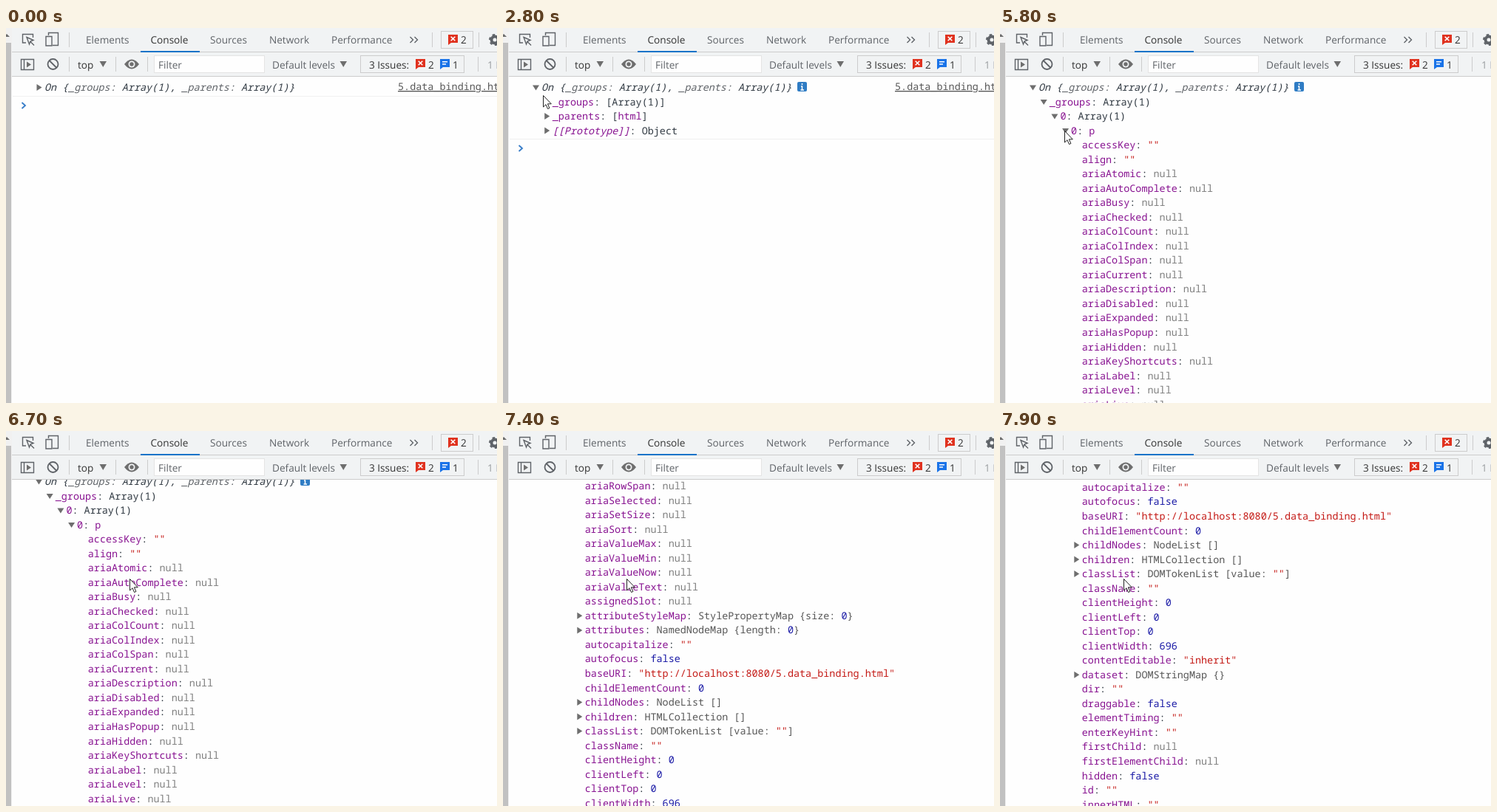
Recreate the animation shown at these times as an HTML page. Size 664 by 508 pixels, loop 8 s.

```html
<!DOCTYPE html>
<html lang="en">
<head>
<meta charset="utf-8">
<title>Console</title>
<style>
  html, body { margin: 0; width: 100%; height: 100%; overflow: hidden; background: #fefefe; }
  svg { display: block; width: 664px; height: 508px; }
  text { white-space: pre; text-rendering: geometricPrecision; }
  .ui text { font: 13.6px "Open Sans", "Noto Sans", sans-serif; fill: #5f6368; }
  .ui .dark { fill: #333333; }
  .mono text { font: 13.45px "Noto Sans Mono", "DejaVu Sans Mono", monospace; fill: #303942; }
  .mono .it { font-style: italic; }
  .key { fill: #881391; }
  .dim { fill: #b871bd; }
  .pre { fill: #5f6368; }
  .mono .obj { fill: #565656; }
  .nil { fill: #808080; }
  .str { fill: #c41a16; }
  .num { fill: #1a1aa6; }
  .line { fill: none; stroke: #5f6368; stroke-width: 1.4; }
  .sep { stroke: #cccccc; }
  .solid { fill: #6e6e6e; }
</style>
</head>
<body>
<svg viewBox="0 0 664 508">
  <defs>
    <clipPath id="view"><rect x="8" y="66" width="656" height="442"/></clipPath>
    <g id="error">
      <path d="M0 0H13V11H4L0 14Z" fill="#e0321f"/>
      <path d="M3.7 2.7L9.3 8.3M9.3 2.7L3.7 8.3" stroke="#fff" stroke-width="1.6"/>
    </g>
    <g id="note">
      <path d="M0 0H13V11H4L0 14Z" fill="#1a73e8"/>
      <path d="M3 3.8H10M3 7H8" stroke="#fff" stroke-width="1.4"/>
    </g>
  </defs>

  <rect width="664" height="508" fill="#fefefe"/>
  <g clip-path="url(#view)"><g id="scroller" class="mono"></g></g>

  <g class="ui">
    <rect width="664" height="66" fill="#f1f3f4"/>
    <rect width="8" height="508" fill="#f1f1f1"/>
    <rect y="20" width="7" height="488" fill="#c1c1c1"/>
    <path class="solid" d="M-3 12L1 8L5 12Z"/>
    <path class="sep" d="M8 32.5H664M8 65.5H664M85.5 6V26M576.5 6V26M639.5 6V26M85.5 39V59M148.5 39V59M191.5 39V59M638.5 39V59"/>
    <rect x="182" y="31" width="80" height="2" fill="#1a73c8"/>

    <path class="line" d="M27 20H22.5V8.5H36.5V13M28 12.5L37 16.5L33 18L31.5 22ZM33 18.5L38 23.5"/>
    <path class="line" d="M57.5 10V6.5H70.5V23.5H63M54 11.5H62V24H54Z"/>
    <text x="108" y="21">Elements</text>
    <text x="195.5" y="21" class="dark">Console</text>
    <text x="276" y="21">Sources</text>
    <text x="356" y="21">Network</text>
    <text x="440" y="21">Performance</text>
    <path class="line" d="M546.5 12L550.5 16L546.5 20M552.5 12L556.5 16L552.5 20"/>
    <rect class="sep" x="588.5" y="4.5" width="43" height="23" fill="none"/>
    <use href="#error" x="598" y="9"/>
    <text x="615" y="21" class="dark">2</text>
    <circle class="line" cx="661" cy="16" r="4.5" style="stroke-width:4"/>
    <circle class="line" cx="661" cy="16" r="7" style="stroke-width:2;stroke-dasharray:3.66"/>

    <path class="line" d="M20.5 42.5H37.5V56.5H20.5ZM24.5 42V57"/>
    <path class="solid" d="M28 45.5L34 49.5L28 53.5Z"/>
    <circle class="line" cx="63.5" cy="49" r="7" style="stroke-width:1.8"/>
    <path class="line" d="M58.5 44L68.5 54" style="stroke-width:1.8"/>
    <text x="97" y="54.5" class="dark">top</text>
    <path class="solid" d="M126.5 45H136L131.25 53Z"/>
    <path class="solid" d="M160 49Q170 36 180 49Q170 62 160 49Z"/>
    <circle cx="170" cy="49" r="4.5" fill="#f1f3f4"/>
    <circle class="solid" cx="170" cy="49" r="2.7"/>
    <rect x="200.5" y="37.5" width="149" height="23" fill="#fefefe" stroke="#e4e4e4"/>
    <text x="206" y="54.5">Filter</text>
    <text x="360" y="54.5">Default levels</text>
    <path class="solid" d="M451.5 45H461L456.25 53Z"/>
    <rect class="sep" x="479.5" y="37.5" width="140" height="23" fill="none"/>
    <text x="491" y="54.5" class="dark">3 Issues:</text>
    <use href="#error" x="554" y="42"/>
    <text x="571" y="54.5" class="dark">2</text>
    <use href="#note" x="587" y="42"/>
    <text x="604" y="54.5" class="dark">1</text>
    <text x="651" y="54.5" style="fill:#9a9da0">1 Hidden</text>
  </g>

  <path id="pointer" d="M.5 .5V16L4 12.7L6.5 18.5L8.9 17.5L6.4 11.8H11.3Z" fill="#fff" stroke="#222" stroke-width="1"/>
</svg>

<script>
const LOOP = 8000, PITCH = 19.53, INDENT = 14.7;
const $ = id => document.getElementById(id);
const span = (cls, s) => `<tspan class="${cls}">${s}</tspan>`;

// Leading spaces give the depth; + is a closed node, - an open one.
const aria = `Atomic AutoComplete Busy Checked ColCount ColIndex ColSpan Current Description
  Disabled Expanded HasPopup Hidden KeyShortcuts Label Level Live Modal MultiLine MultiSelectable
  Orientation Placeholder PosInSet Pressed ReadOnly Relevant Required RoleDescription RowCount
  RowIndex RowSpan Selected SetSize Sort ValueMax ValueMin ValueNow ValueText`.split(/\s+/);
const props = [
  'accessKey: ""', 'align: ""', ...aria.map(name => `aria${name}: null`), 'assignedSlot: null',
  '+attributeStyleMap: StylePropertyMap {size: 0}', '+attributes: NamedNodeMap {length: 0}',
  'autocapitalize: ""', 'autofocus: false', 'baseURI: "http://localhost:8080/5.data_binding.html"',
  'childElementCount: 0', '+childNodes: NodeList []', '+children: HTMLCollection []',
  '+classList: DOMTokenList [value: ""]', 'className: ""', 'clientHeight: 0', 'clientLeft: 0',
  'clientTop: 0', 'clientWidth: 696', 'contentEditable: "inherit"', '+dataset: DOMStringMap {}',
  'dir: ""', 'draggable: false', 'elementTiming: ""', 'enterKeyHint: ""', 'firstChild: null',
  'firstElementChild: null', 'hidden: false', 'id: ""', 'innerHTML: ""'
].map(p => '    ' + p);
const root = 'On {_groups: Array(1), _parents: Array(1)}';
const tail = [' +_parents: [html]', ' +[[Prototype]]: Object'];
const groupTail = ['  length: 1', '  +[[Prototype]]: Array(0)'];
const open = ['-' + root, ' -_groups: Array(1)'];
const trees = [
  ['+' + root],
  ['-' + root, ' +_groups: [Array(1)]', ...tail],
  [...open, '  +0: Array(1)', ...groupTail, ...tail],
  [...open, '  -0: Array(1)', '   +0: p', '   length: 1', '   +[[Prototype]]: Array(0)', ...groupTail, ...tail],
  [...open, '  -0: Array(1)', '   -0: p', ...props]
];

function colorValue(value, deep) {
  const body = value.replace(/"[^"]*"|(?<!\()\b\d+\b|\bnull\b|\bfalse\b|\bhtml\b|^p$/g, s =>
    span(s[0] === '"' ? 'str' : s === 'null' ? 'nil' : /^(\d|false)/.test(s) ? 'num' : 'key', s));
  return deep ? span('obj', body) : body;
}

function colorRow(text, depth) {
  if (!depth) return text.replace(/_\w+:/g, s => span('pre', s));
  const [, key, value] = text.match(/^(.*?): (.*)$/);
  const cls = key === 'length' ? 'dim' : key[0] === '[' ? 'key it' : 'key';
  return span(cls, key) + ': ' + colorValue(value, depth === 4);
}

function drawRow(row, i) {
  const [, pad, mark, text] = row.match(/^( *)([+-]?)(.*)$/);
  const depth = pad.length, x = 52 + INDENT * depth, y = 85 + PITCH * i;
  const cx = x - 7.5, cy = y - 4.5;
  const arrow = mark === '+' ? `M${cx - 3} ${cy - 4.5}l7 4.5l-7 4.5z`
    : mark === '-' ? `M${cx - 4.5} ${cy - 3}h9l-4.5 7z` : '';
  return `<path class="solid" d="${arrow}"/>` +
    `<text x="${x}" y="${y}" class="${depth ? '' : 'it'}">${colorRow(text, depth)}</text>`;
}

function drawTree(rows) {
  const end = Math.round(92 + PITCH * (rows.length - 1)) - (rows.length > 1 ? 1 : 0) + .5;
  const info = rows.length > 1
    ? `<rect x="398" y="73" width="13" height="13" rx="2" fill="#2f7cc4"/>
       <path d="M404.5 75V77M403 79H404.5V84M402.5 84H407" fill="none" stroke="#fff" stroke-width="1.5"/>` : '';
  const link = rows.includes(props[0]) ? ''
    : '<text x="530" y="84" class="obj" text-decoration="underline">5.data_binding.html</text>';
  return `<g>${rows.map(drawRow).join('')}${info}${link}
    <path d="M9 ${end}H664" stroke="#f0f0f0"/>
    <path d="M21.5 ${end + 8.5}l4.5 4l-4.5 4" fill="none" stroke="#367cc8" stroke-width="1.8"/></g>`;
}

const scroller = $('scroller'), pointer = $('pointer');
scroller.innerHTML = trees.map(drawTree).join('');
const views = [...scroller.children];

// Each step holds until the next: [time, value...]
const treeSteps = [[0, 0], [2200, 1], [3500, 2], [4400, 3], [5800, 4]];
const scrollSteps = [[0, 0], [6700, 12], [6800, 62], [6900, 118], [7000, 205], [7100, 303], [7200, 440],
  [7300, 590], [7400, 709], [7500, 733], [7700, 760], [7800, 838], [7900, 922]];
const pointerSteps = [[0, -40, 0], [700, 3, 330], [800, 120, 250], [900, 235, 190], [1000, 262, 165],
  [1100, 190, 138], [1200, 90, 108], [1300, 22, 92], [1500, 26, 90], [1600, 32, 86], [1700, 37, 83],
  [1800, 41, 81], [2800, 54, 91], [2900, 57, 98], [3300, 56, 99], [3800, 59, 104], [3900, 66, 114],
  [4000, 71, 121], [5000, 75, 127], [5100, 82, 134], [5200, 86, 139], [5400, 87, 139],
  [6200, 104, 152], [6300, 135, 177], [6400, 158, 193], [6500, 167, 200]];
const at = (steps, t) => steps.findLast(s => s[0] <= t);

function frame() {
  const t = performance.now() % LOOP;
  const [, shown] = at(treeSteps, t), [, top] = at(scrollSteps, t), [, x, y] = at(pointerSteps, t);
  views.forEach((view, i) => view.style.display = i === shown ? '' : 'none');
  scroller.setAttribute('transform', `translate(0 ${-top})`);
  pointer.setAttribute('transform', `translate(${x} ${y})`);
  requestAnimationFrame(frame);
}
frame();
</script>
</body>
</html>
```
